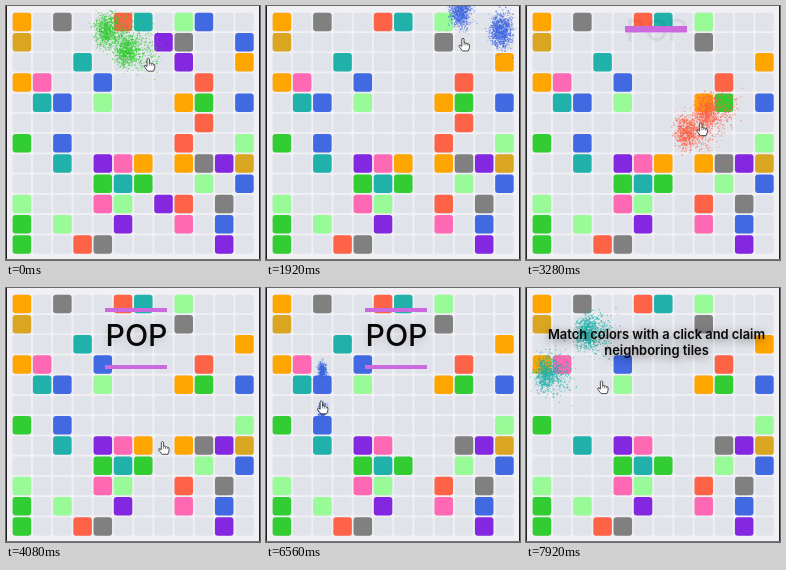
Write an HTML page with a canvas that moves like this. It is 254 px wide and 254 px high and loops after 8 s.

```html
<!DOCTYPE html>
<html lang="en">
<head>
<meta charset="utf-8">
<title>Color tiles</title>
<style>
  html, body { margin: 0; width: 100%; height: 100%; overflow: hidden; background: #f0f0f5; }
  canvas { display: block; width: 254px; height: 254px; }
</style>
</head>
<body>
<canvas id="stage"></canvas>
<script>
const SIZE = 254, LOOP = 8000, PITCH = 20.23, FIRST = 15.9, TILE = 18.5;
const canvas = document.getElementById('stage');
const ctx = canvas.getContext('2d');
const ratio = window.devicePixelRatio || 1;
canvas.width = canvas.height = Math.round(SIZE * ratio);

const COLORS = {
  o: '#ffa500', x: '#808080', r: '#ff6347', t: '#20b2aa', l: '#98fb98',
  b: '#4169e1', d: '#daa520', v: '#8427e0', p: '#ff69b4', g: '#32cd32'
};
const BOARD = [
  'o.x..rt.lb..',
  'd....g.vx..b',
  '...t..g.v..o',
  'op..b....r..',
  '.tb.l...og.b',
  '.........r..',
  'g.b.....r..l',
  '..t.vpo.oxvd',
  '....gtg..l.b',
  'l...pl.vr.x.',
  'g.l..v..p.b.',
  'g..rx.....v.'
];

const CLICKS = [
  { time: -450, row: 2, col: 5 },
  { time: 580, row: 2, col: 7 },
  { time: 1720, row: 1, col: 9 },
  { time: 2850, row: 5, col: 8 },
  { time: 4210, row: 7, col: 7 },
  { time: 6500, row: 5, col: 2, bend: 38 },
  { time: 7560, row: 4, col: 3 }
];
const REST = 330, LEAD = 500; // hand stays after a click, arrives before the next

const clamp = v => Math.max(0, Math.min(1, v));
const mix = (a, b, k) => a + (b - a) * k;
const smooth = k => k * k * (3 - 2 * k);
const phase = (t, from, to) => smooth(clamp((t - from) / (to - from)));
const center = i => FIRST + i * PITCH;

function randomizer(seed) {
  return () => {
    seed = (seed + 0x6d2b79f5) | 0;
    let n = Math.imul(seed ^ (seed >>> 15), 1 | seed);
    n = (n + Math.imul(n ^ (n >>> 7), 61 | n)) ^ n;
    return ((n ^ (n >>> 14)) >>> 0) / 4294967296;
  };
}

function makeSpecks(seed) {
  const rnd = randomizer(seed);
  const bell = () => (rnd() + rnd() + rnd() + rnd() - 2) * 1.7;
  return Array.from({ length: 1000 }, () => ({
    gx: bell(), gy: bell(),
    drift: rnd() < 0.45 ? Math.pow(rnd(), 1.7) : 0,
    birth: rnd() * 0.18,
    life: 0.65 + rnd() * 0.5,
    size: 0.6 + rnd() * 0.7,
    alpha: 0.5 + rnd() * 0.5
  }));
}

// A click clears the nearest tiles in the four directions that share a color
function playGame() {
  const cells = BOARD.map((line, row) => [...line].map((key, col) =>
    ({ row, col, key, color: COLORS[key], cleared: Infinity })));
  const filled = c => c.key !== '.' && c.cleared === Infinity;
  const look = (row, col, dr, dc) => {
    let cell;
    do cell = cells[row += dr]?.[col += dc]; while (cell && !filled(cell));
    return cell;
  };
  for (const { time, row, col } of CLICKS) {
    const near = [[-1, 0], [1, 0], [0, -1], [0, 1]]
      .map(([dr, dc]) => look(row, col, dr, dc)).filter(Boolean);
    near.filter(a => near.some(b => b !== a && b.key === a.key))
      .forEach(c => { c.cleared = time; c.specks = makeSpecks(c.row * 97 + c.col * 13); });
  }
  return cells.flat();
}
const cells = playGame();
const bursts = cells.filter(c => c.specks);

function box(x, y, radius, color) {
  ctx.fillStyle = color;
  ctx.beginPath();
  ctx.roundRect(x - TILE / 2, y - TILE / 2, TILE, TILE, radius);
  ctx.fill();
}

function drawBoard(t) {
  ctx.fillStyle = '#f0f0f5';
  ctx.fillRect(0, 0, SIZE, SIZE);
  for (const c of cells) {
    const x = center(c.col), y = center(c.row);
    box(x, y, 2, '#e1e3ea');
    if (c.color && t - c.cleared <= 100) box(x, y, 3, c.color);
  }
  ctx.fillStyle = '#202020';
  ctx.fillRect(0, 0, 1, SIZE);
  ctx.fillRect(SIZE - 1, 0, 1, SIZE);
  ctx.fillStyle = '#77777a';
  ctx.fillRect(0, SIZE - 1, SIZE, 1);
}

function drawBurst(cell, t) {
  const age = (t - cell.cleared) / 1000;
  if (age < 0 || age > 1.2) return;
  const late = Math.max(0, age - 0.52);
  const open = clamp((age - 0.03) / 0.18);
  const left = -18 * smooth(clamp((age - 0.1) / 0.32));
  const up = mix(-15, -11.5, open) + late * 8;
  const sx = mix(1.5, 5.3, open) + late * 30;
  const sy = mix(2.5, 8, open) + late * 24;
  const tail = 95 * clamp((age - 0.14) / 0.38) * 0.38;
  const dim = mix(1, 0.4, clamp(late / 0.25));
  ctx.fillStyle = cell.color;
  for (const s of cell.specks) {
    const fade = clamp((s.life - age) / 0.15);
    if (!fade || s.birth > age) continue;
    ctx.globalAlpha = s.alpha * fade * dim;
    const x = center(cell.col) + left + s.gx * sx + s.drift * tail;
    const y = center(cell.row) + up + s.gy * sy * (1 + s.drift * 0.5);
    ctx.fillRect(x - s.size / 2, y - s.size / 2, s.size, s.size);
  }
  ctx.globalAlpha = 1;
}

function label(text, y, size, weight, alpha, shade) {
  if (alpha <= 0) return;
  ctx.save();
  ctx.globalAlpha = alpha;
  ctx.font = `${weight} ${size}px Inter, "Open Sans", sans-serif`;
  ctx.textAlign = 'center';
  ctx.fillStyle = '#080808';
  ctx.shadowColor = `rgba(0,0,0,${shade})`;
  ctx.shadowBlur = 9 * ratio;
  ctx.shadowOffsetY = 2 * ratio;
  ctx.fillText(text, 130.5, y);
  ctx.restore();
}

function drawTitle(t) {
  const grow = phase(t, 2960, 3240) * (1 - phase(t, 7040, 7240));
  const open = phase(t, 3200, 3840) * (1 - phase(t, 6680, 7080));
  if (grow > 0) {
    label('POP', mix(34, 58, open), 30.3, 500, clamp(open * 1.5), 0.15);
    const width = 62 * grow;
    ctx.fillStyle = '#cb69df';
    ctx.fillRect(130 - width / 2, 20, width, 4);
    ctx.fillRect(130 - width / 2, mix(20, 77, open), width, 4);
  }
  const shown = phase(t, 7200, 7640);
  label('Match colors with a click and claim', 51, 12.9, 600, shown, 0.5);
  label('neighboring tiles', 66.5, 12.9, 600, shown, 0.5);
}

const hand = new Path2D(
  'M-1.2 .8 Q0 -.7 1.1 .8 V5 Q2.3 4.1 3 5.3 Q4.2 4.6 4.8 5.8 Q6.5 5.4 6.5 7.2 ' +
  'V9.5 L5.3 12.8 H-.5 L-3.7 8.5 Q-4.2 6.8 -2.6 7.1 L-1.2 8.3 Z');
const fingers = new Path2D('M1.1 5 V7.3 M3 5.4 V7.5 M4.8 6 V7.7');

function handPlace(t) {
  const i = CLICKS.findLastIndex(c => c.time + REST <= t);
  const from = CLICKS[Math.max(0, i)], to = CLICKS[i + 1] || from;
  const k = to === from ? 0 : phase(t, from.time + REST, to.time - LEAD);
  const sway = (to.bend || 0) * 4 * k * (1 - k);
  return [
    mix(center(from.col), center(to.col), k) - 1,
    mix(center(from.row), center(to.row), k) + sway - 4
  ];
}

function drawHand(t) {
  ctx.save();
  ctx.translate(...handPlace(t));
  ctx.fillStyle = '#fff';
  ctx.strokeStyle = '#222';
  ctx.lineWidth = 0.8;
  ctx.lineJoin = 'round';
  ctx.fill(hand);
  ctx.stroke(hand);
  ctx.lineWidth = 0.5;
  ctx.stroke(fingers);
  ctx.restore();
}

function draw(t) {
  ctx.setTransform(ratio, 0, 0, ratio, 0, 0);
  drawBoard(t);
  bursts.forEach(cell => drawBurst(cell, t));
  drawTitle(t);
  drawHand(t);
}

let start = null;
function tick(now) {
  if (start === null) start = now;
  draw(Math.max(0, now - start) % LOOP);
  requestAnimationFrame(tick);
}
draw(0);
requestAnimationFrame(tick);
</script>
</body>
</html>
```
